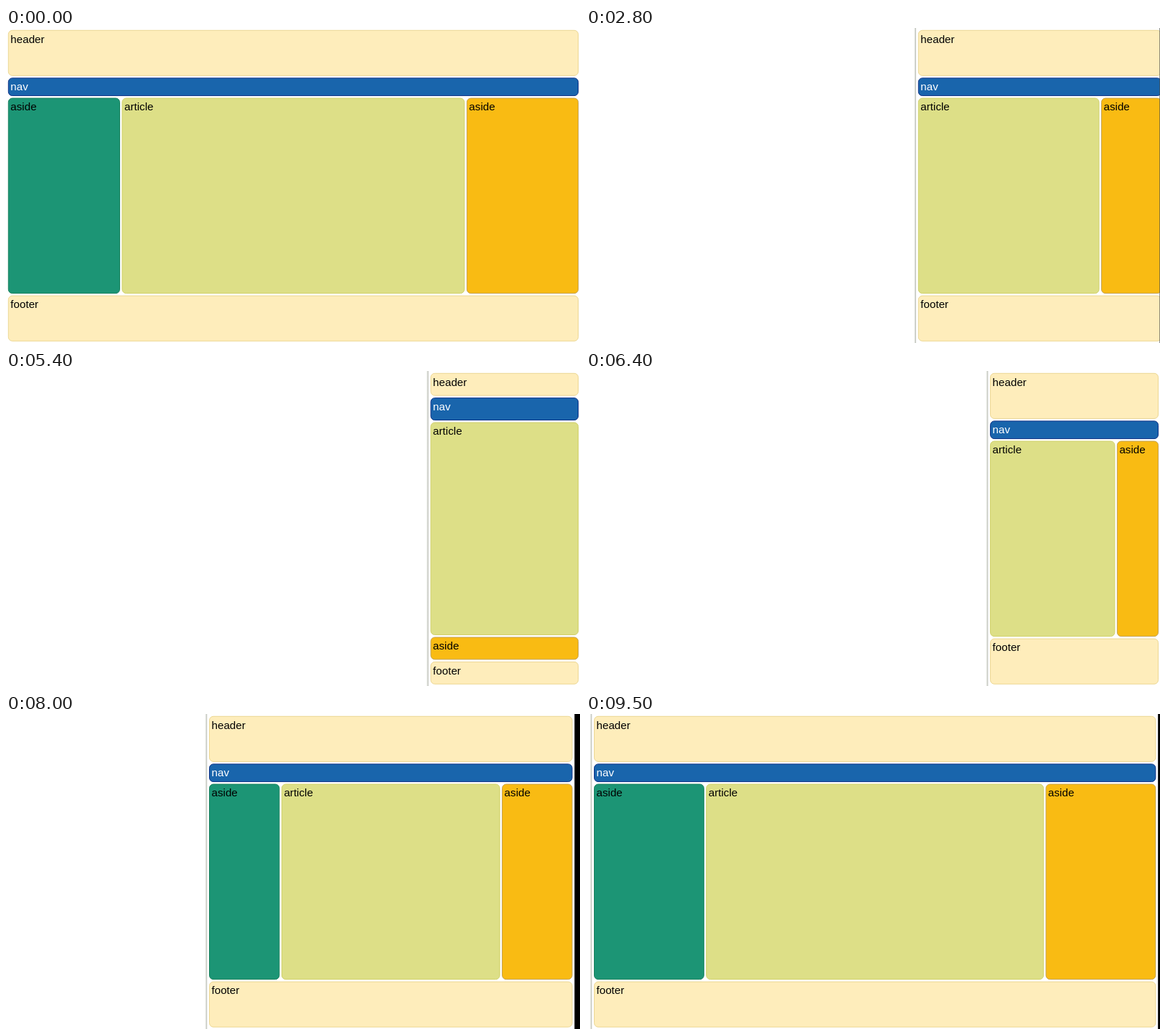
Write an HTML page that moves like this. It is 800 by 440 pixels and loops after 9.6 s.

```html
<!DOCTYPE html>
<html lang="en">
<head>
<meta charset="utf-8">
<title>Responsive layout</title>
<style>
html, body { margin: 0; width: 100%; height: 100%; overflow: hidden; background: #000; }
svg { display: block; }
text { font: 15.2px "Liberation Sans", Arial, sans-serif; }
.cream { fill: #feedbb; stroke: #ecd793; }
.blue { fill: #1965ac; stroke: #0b2f86; }
.green { fill: #1c9575; stroke: #16805c; }
.lime { fill: #dddf87; stroke: #d0d168; }
.amber { fill: #f9bb13; stroke: #c4a04c; }
.blue + text { fill: #fff; }
</style>
</head>
<body>
<svg id="stage" width="800" height="440" viewBox="0 0 800 440">
  <defs>
    <linearGradient id="shade">
      <stop offset="0" stop-color="#fff"/>
      <stop offset=".4" stop-color="#e6e8e2"/>
      <stop offset="1" stop-color="#b4b7b0"/>
    </linearGradient>
  </defs>
  <rect id="page" height="440" fill="#fff"/>
  <rect id="edge" width="3" height="440" fill="url(#shade)"/>
  <rect id="rim" x="799" width="1" height="440" fill="#464b46" opacity=".6"/>
</svg>
<script>
const LOOP = 9600, STEP = 100, PAD = 2.8, GAP = 2.5, BOTTOM = 437.7;
const stage = document.getElementById("stage");
const page = document.getElementById("page");
const edge = document.getElementById("edge");
const rim = document.getElementById("rim");

// Turning points of the dragged window edge: [ms, x]
const drag = [
  [0, 0], [1400, 212.7], [2000, 344], [2800, 460], [3000, 490], [4100, 592],
  [4300, 603], [4900, 603], [6400, 560.3], [6900, 512], [8000, 280.2],
  [8900, 80], [9500, 8.2]
];

function leftAt(t) {
  const i = drag.findIndex(([time]) => time >= t);
  if (i < 1) return drag[0][1];
  const [t0, a] = drag[i - 1], [t1, b] = drag[i];
  return a + (b - a) * (t - t0) / (t1 - t0);
}

// The right end swings outwards while shrinking, inwards while growing
function rightAt(t) {
  const swing = (from, to) => t > from && t < to ? Math.sin(Math.PI * (t - from) / (to - from)) : 0;
  return 798 + 5 * swing(0, 4100) - 8.6 * swing(6400, 10000);
}

function add(tag, parent) {
  return parent.appendChild(document.createElementNS("http://www.w3.org/2000/svg", tag));
}

function set(node, attrs) {
  for (const name in attrs) node.setAttribute(name, attrs[name]);
}

function makeBox(label, color) {
  const group = add("g", stage);
  const rect = add("rect", group), text = add("text", group);
  set(rect, { class: color, rx: 5.5 });
  text.textContent = label;
  return { group, rect, text };
}

const header = makeBox("header", "cream");
const nav = makeBox("nav", "blue");
const menu = makeBox("aside", "green");
const article = makeBox("article", "lime");
const extra = makeBox("aside", "amber");
const footer = makeBox("footer", "cream");
stage.append(rim);

function place(box, x, width, row) {
  set(box.rect, { x: x + .5, y: row.y + .5, width: width - 1, height: row.height - 1 });
  set(box.text, { x: x + 3.5, y: row.y + 17.7 });
}

// Splits the stage height into rows by percentage
function rowsOf(...shares) {
  const space = BOTTOM - PAD - GAP * (shares.length - 1);
  let y = PAD;
  return shares.map(share => {
    const row = { y, height: space * share / 100 };
    y += row.height + GAP;
    return row;
  });
}

const stacked = rowsOf(7.5, 7.5, 70, 7.5, 7.5);
const columns = rowsOf(15, 6, 64, 15);

function layout(x, width) {
  const wide = width >= 445;
  menu.group.style.display = wide ? "" : "none";
  if (width < 220) {
    [header, nav, article, extra, footer].forEach((box, i) => place(box, x, width, stacked[i]));
    return;
  }
  const [top, bar, main, base] = columns;
  place(header, x, width, top);
  place(nav, x, width, bar);
  place(footer, x, width, base);
  const side = wide ? width * .2 - 2.9 : (width - GAP) / 4;
  const inset = wide ? side + GAP : 0;
  if (wide) place(menu, x, side, main);
  place(article, x + inset, width - inset - side - GAP, main);
  place(extra, x + width - side, side, main);
}

function draw(time) {
  const t = Math.floor(time % LOOP / STEP) * STEP;
  const left = leftAt(t), right = rightAt(t);
  set(page, { width: right + PAD });
  set(edge, { x: left - 3 });
  rim.style.display = t >= STEP && t < 5000 ? "" : "none";
  layout(left + PAD, right - left - PAD);
}

const start = performance.now();
function tick() {
  draw(performance.now() - start);
  requestAnimationFrame(tick);
}
tick();
</script>
</body>
</html>
```
